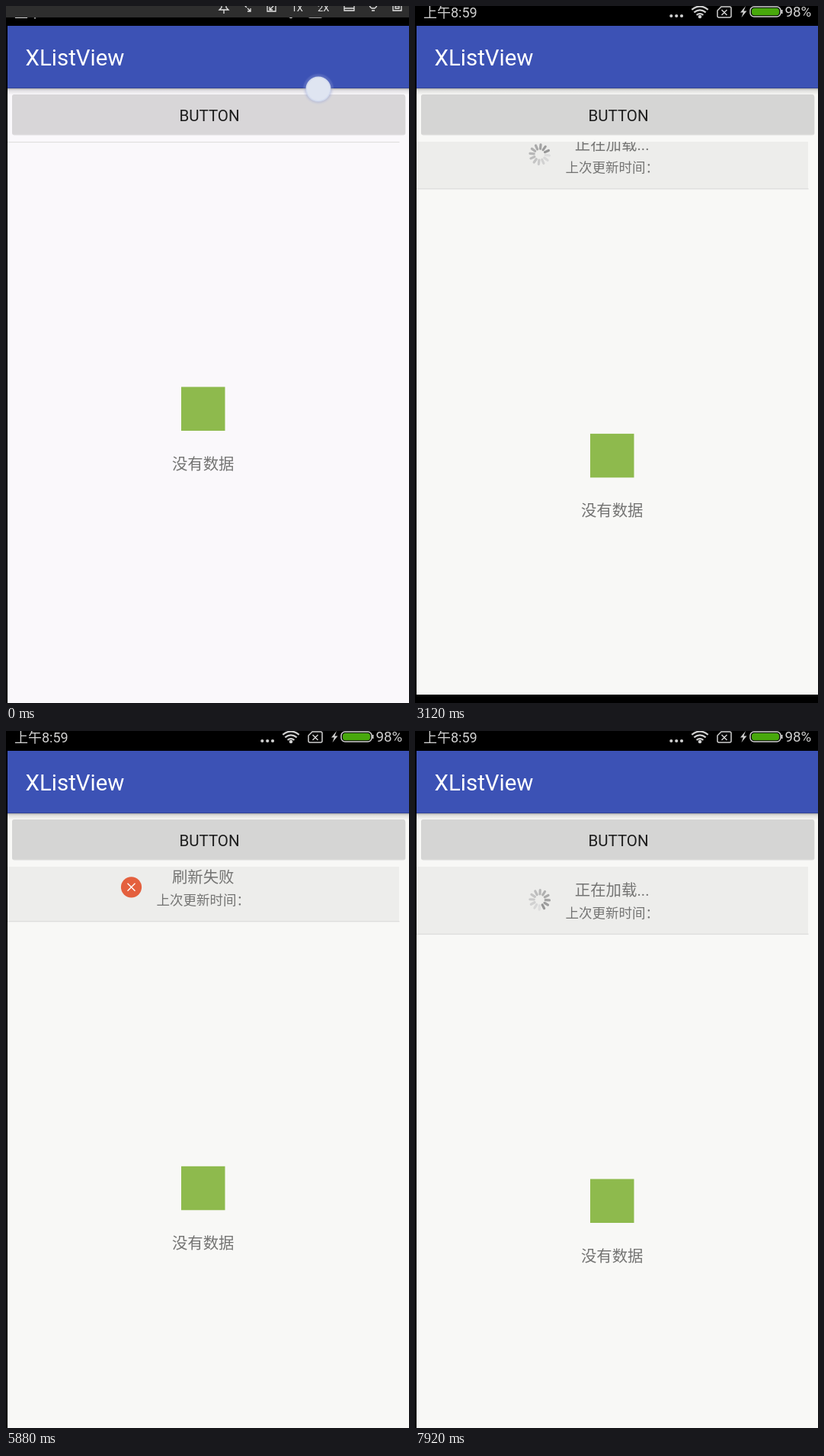
An HTML page for the animation above (8000 ms loop, 529 px wide and 914 px high).

```html
<!DOCTYPE html>
<html lang="zh-CN">
<head>
<meta charset="utf-8">
<title>XListView</title>
<style>
html, body { margin: 0; width: 100%; height: 100%; overflow: hidden; background: #000; }
svg { display: block; width: 100%; height: 100%; }
text { font-family: Roboto, "Noto Sans CJK SC", "Noto Sans CJK", sans-serif; }
.mid { text-anchor: middle; }
.line { fill: none; stroke: #e4e4e4; stroke-width: 1.3; }
.body { font-size: 20.4px; fill: #747473; }
.jp { font-family: "Noto Sans CJK JP", sans-serif; }
</style>
</head>
<body>
<svg viewBox="0 0 529 914" preserveAspectRatio="none">
  <defs>
    <linearGradient id="shade" x2="0" y2="1">
      <stop offset="0" stop-color="#000" stop-opacity=".34"/>
      <stop offset=".35" stop-color="#000" stop-opacity=".1"/>
      <stop offset="1" stop-color="#000" stop-opacity="0"/>
    </linearGradient>
    <radialGradient id="halo">
      <stop offset=".72" stop-color="#7f8cc8" stop-opacity=".5"/>
      <stop offset="1" stop-color="#c4cbe8" stop-opacity="0"/>
    </radialGradient>
    <clipPath id="list"><rect x="2" y="178" width="527" height="736"/></clipPath>
  </defs>

  <rect width="529" height="914"/>
  <rect id="page" x="2" y="26" width="527" height="888"/>

  <g clip-path="url(#list)">
    <g id="header">
      <rect x="2" y="178" width="514" height="88" fill="#ededeb"/>
      <rect x="2" y="265.7" width="514.5" height="1.4" fill="#dededd"/>
      <g id="spinner"></g>
      <g id="failed">
        <circle cx="164.5" cy="221.5" r="13.6" fill="#e4603e"/>
        <path d="M159.5 216.5l10 10m0-10l-10 10" stroke="#fff" stroke-width="1.4"/>
      </g>
      <text id="state" class="body mid" x="258.7" y="215.6"></text>
      <text x="197.5" y="244.7" font-size="17.5" fill="#747473">上次更新时间<tspan class="jp">：</tspan></text>
    </g>
    <g id="empty">
      <rect x="230" y="499.5" width="57.5" height="57.5" fill="#8eba4d"/>
      <text class="body mid" x="258.7" y="607.8">没有数据</text>
    </g>
  </g>

  <rect x="2" y="26" width="527" height="82" fill="#3c52b5"/>
  <rect x="2" y="107.5" width="527" height="9" fill="url(#shade)"/>
  <text x="25.6" y="78.3" font-size="29.4" fill="#fff">XListView</text>

  <rect x="8" y="117" width="516.5" height="52.5" rx="3" fill="#000" opacity=".1"/>
  <rect id="button" x="8" y="116" width="516" height="52.5" rx="2.5"/>
  <text class="mid" x="267" y="151" font-size="20.5" fill="#1c1c1c">BUTTON</text>

  <g id="touch">
    <circle r="21" fill="url(#halo)"/>
    <circle id="dot" r="15.7" stroke-width="1.5"/>
  </g>

  <g fill="#cfcfcf">
    <text x="11" y="15" font-size="18">上午8:59</text>
    <text x="485.5" y="14.3" font-size="18.8">98%</text>
    <circle cx="336.3" cy="13" r="2.1"/>
    <circle cx="343.2" cy="13" r="2.1"/>
    <circle cx="350" cy="13" r="2.1"/>
    <circle cx="374" cy="14" r="2.3"/>
    <path d="M434 0l-7 8.5h3.8l-2.3 6.500l7-8.500h-4z"/>
    <rect x="480.500" y="5" width="2" height="5"/>
    <g fill="none" stroke="#cfcfcf">
      <path d="M363.300 4.800q10.700-8.600 21.400 0M366.300 8.400q7.700-6.200 15.400 0M369.600 11.800q4.400-3.400 8.800 0" stroke-width="2.200"/>
      <path d="M402 1h11q2 0 2 2v10q0 2-2 2h-14q-2 0-2-2v-7zM402.500 5l7 7m0-7l-7 7" stroke-width="1.500"/>
      <rect x="440" y="1" width="40" height="13" rx="5" stroke-width="1.500"/>
    </g>
    <rect x="442" y="2.700" width="36" height="9.600" rx="3.600" fill="#48a80c"/>
  </g>

  <rect id="foot" x="2" y="903" width="527" height="11"/>

  <g id="tools">
    <rect width="529" height="15" fill="#2e2e2e"/>
    <path class="line" d="M283 0v2l-3 3h12l-3-3v-2M286 5v5
      M313-1l3 3M317 3l4 4m0-4v4h-4
      M343 -3v10h11v-10M351 0l-5 5m0-4v4h4
      M444-3v9h13v-9M444 3h13
      M477-2q0 3 3 5h4q3-2 3-5M480 6h4
      M508-3v9h11v-9M511-2v5h5v-5M511 0h5"/>
    <text x="374.500" y="6.500" font-size="13" fill="#e4e4e4">1X</text>
    <text x="409" y="6.500" font-size="13" fill="#e4e4e4">2X</text>
  </g>
</svg>
<script>
const LOOP = 8000, STEP = 120, OPEN = 88, SLIDE = 400;
const PRESSES = [2880, 6480], FAIL = 4840, CLOSE = 5840;
const $ = id => document.getElementById(id);
const set = (id, attrs) => {
  for (const key in attrs) $(id).setAttribute(key, attrs[key]);
};
const show = (id, on) => set(id, { visibility: on ? 'visible' : 'hidden' });
const slide = ms => {
  const left = 1 - Math.min(1, Math.max(0, ms / SLIDE));
  return 1 - left * left;
};

// Twelve spokes, darkest at the head (12 o'clock) and fading behind it.
$('spinner').innerHTML = Array.from({ length: 12 }, (_, i) => {
  const grey = Math.round(150 + 72 * i / 11);
  return `<path d="M0-7.5V-12.8" transform="rotate(${-30 * i})" stroke="rgb(${grey},${grey},${grey})" stroke-width="3.2" stroke-linecap="round"/>`;
}).join('');

function draw(time) {
  const t = Math.floor(time / STEP) * STEP;
  const second = t >= PRESSES[1];
  const press = PRESSES[second ? 1 : 0];
  const since = t - press;
  const pressed = since >= 0 && since < STEP;
  const fading = since >= STEP && since < 2 * STEP;
  const warm = t > PRESSES[0];
  const failed = !second && t >= FAIL;

  let open = slide(since - 60);
  if (!second && t >= CLOSE) open = 1 - slide(t - CLOSE);
  const shift = OPEN * open;

  set('page', { fill: warm ? '#f8f8f6' : '#faf8fb' });
  set('header', { transform: `translate(0 ${shift - OPEN})` });
  set('empty', { transform: `translate(0 ${shift})` });
  set('button', { fill: pressed ? '#bdbcbc' : fading ? '#cacac9' : warm ? '#d5d5d4' : '#d8d6d8' });

  const turn = 0.36 * (t - press - 40) + 0.36 * (second ? 40 : 0) - 6;
  set('spinner', { transform: `translate(163.7 221.3) rotate(${turn})` });
  show('spinner', !failed);
  show('failed', failed);
  $('state').textContent = failed ? '刷新失败' : '正在加载...';

  show('touch', t <= PRESSES[0] || (second && pressed));
  set('touch', { transform: second ? 'translate(409.5 130)' : 'translate(410 109)' });
  set('dot', { fill: second ? '#e4e4e2' : '#dfe5f1', stroke: second ? '#a9afd0' : '#d3dbee' });

  show('foot', t >= 1560 && t < 4080);
  show('tools', t < STEP);
}

const start = performance.now();
function tick() {
  draw((performance.now() - start) % LOOP);
  requestAnimationFrame(tick);
}
tick();
</script>
</body>
</html>
```
